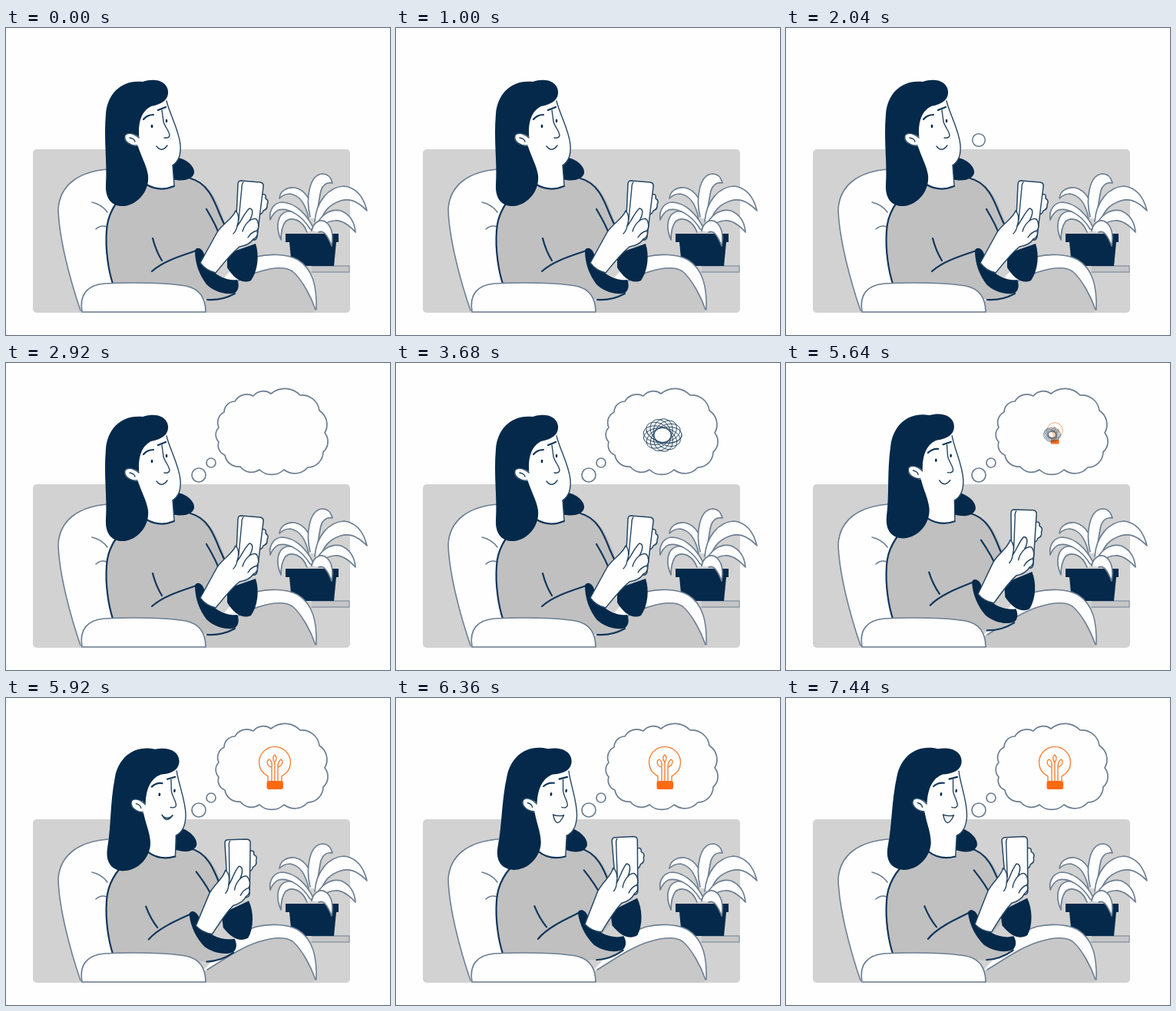
Animation, 500 px wide and 400 px high, one loop 8 s. Source, as an HTML page:

```html
<!DOCTYPE html>
<html lang="en">
<head>
<meta charset="utf-8">
<title>Bright idea</title>
<style>
html, body { margin: 0; height: 100%; overflow: hidden; background: #fefefe; }
svg { display: block; width: 500px; height: 400px; }
path, circle, ellipse { stroke-linecap: round; stroke-linejoin: round; }
.soft { fill: #fefefe; stroke: #6d7f92; stroke-width: 1.7; }
.skin { fill: #fefefe; stroke: #274763; stroke-width: 1.5; }
.plain { fill: #fefefe; }
.navy { fill: #04294a; }
.knit { fill: #c0c0c1; }
.line { fill: none; stroke: #12365a; stroke-width: 2.2; }
.fine { fill: none; stroke: #274763; stroke-width: 1.4; }
.thin { fill: none; stroke: #6d7f92; stroke-width: 1.6; }
.glow { fill: none; stroke: #f58a45; stroke-width: 1.5; }
</style>
</head>
<body>
<svg viewBox="0 0 500 400">
  <rect x="35" y="158" width="413" height="213" rx="5" fill="#d2d2d2"/>
  <path d="M398 310H447V318H398" fill="#c6c6c8" stroke="#8f99a6" stroke-width="1.3"/>

  <path class="navy" d="M364 268H433V279H430L427 310H372L369 279H364Z"/>
  <g id="plant" class="soft"></g>

  <!-- far armrest and legs -->
  <path class="plain" d="M256 356L300 308 326 298C342 294 366 294 380 302C400 314 405 338 404 368L390 370H262Z"/>
  <path class="thin" d="M310 305Q318 300 326 298C342 294 366 294 380 302C400 314 405 338 404 367"/>
  <path d="M256 357C285 340 306 325 328 318C347 312 364 311 373 317C386 328 398 352 403 368L400 371H256Z" fill="#c8c8c8"/>
  <path class="thin" d="M262 354C285 340 306 325 328 318C347 312 364 311 373 317C386 328 398 352 403 367"/>

  <!-- chair back -->
  <path class="plain" d="M97 368C84 330 69 275 68 236C70 205 94 187 133 184L160 240 150 345 110 370Z"/>
  <path class="thin" d="M97 368C84 330 69 275 68 236C70 205 94 187 133 184M112 227Q125 230 132 240M117 262Q124 256 131 259"/>

  <!-- sweater -->
  <path class="knit" d="M178 205C150 211 134 235 131 262C129 290 134 318 139 335L200 345 240 346 260 318 285 288 288 263C280 236 270 202 240 196L218 197Z"/>
  <path class="line" d="M160 212C142 224 132 245 131 264C129 290 134 318 139 333M240 196C262 201 271 224 278 242Q283 254 288 263"/>

  <g id="head">
    <path class="navy" d="M216 168C232 168 246 179 245 189C242 199 228 200 216 197Z"/>
    <path class="plain" d="M170 140L183 203Q200 214 219 206L217 176 226 160V140Z"/>
    <path class="line" d="M183 204Q200 214 219 206"/>
    <path class="fine" d="M217 178L219 205"/>
    <path class="plain" d="M172 105L209 94C214 112 225 132 227 152C228 168 222 176 214 180L180 176Z"/>
    <path class="fine" d="M209 95C213 112 225 132 227 152C228 167 224 175 217 179"/>
    <path class="navy" d="M178 70C150 67 132 86 130 112C127 146 132 176 130 204C129 225 140 233 154 232C172 230 187 212 185 192C183 178 175 166 171 151L174 147C171 126 175 109 189 102C205 99 212 92 211 82C209 68 193 65 178 70Z"/>
    <path class="plain" d="M179 151C174 137 160 135 155 140C152 148 161 154 173 154Z"/>
    <path class="fine" d="M173 143C165 136 157 136 155 140C153 148 162 154 171 153M161 143Q167 144 168 148"/>
    <path class="line" d="M179 119Q184 113 192 113M198 107L208 103"/>
    <path class="fine" d="M203 107L205 122C207 129 213 135 213 140Q212 144 206 143"/>
    <ellipse class="navy eye" cx="190" cy="128" rx="1.400"/>
    <ellipse class="navy eye" cx="209" cy="121" rx="1.300"/>
    <path id="mouth" class="skin"/>
  </g>

  <g id="arm">
    <path class="line" d="M261 236C267 246 275 260 279 273"/>
    <path class="navy" d="M288 294L325 281C330 296 328 316 319 329C308 334 297 327 288 312Z"/>
    <path class="skin" d="M331 217Q340 215 338 222Q343 225 340 230Q341 236 335 238Q333 244 327 243Z"/>
    <path class="skin" d="M306 199L331 201Q336 202 335 207L327 272Q326 277 321 276L302 272Q298 271 299 266L302 204Q302 199 306 199Z"/>
    <path class="fine" d="M309 201Q307 203 307 208L303 250"/>
    <path class="knit" d="M190 317C204 304 227 297 250 289L272 320 298 346C287 352 274 355 262 354C235 352 212 345 196 334Z"/>
    <path class="line" d="M190 317C204 304 227 297 248 290M298 346C287 352 274 355 262 354"/>
    <path class="line" d="M191 274Q195 290 203 303"/>
    <path class="navy" d="M246 290C248 284 256 287 258 295L273 320C283 327 293 329 301 328C304 334 303 342 298 345C287 349 270 343 261 334C252 322 246 307 246 290Z"/>
    <path class="skin" d="M253 306L275 266C283 254 295 249 299 238C304 243 303 252 301 258C306 252 311 240 317 235C323 236 321 244 317 251Q326 245 328 253Q330 259 327 264Q329 272 322 275Q317 283 304 285C292 295 282 308 273 319Q260 316 253 306Z"/>
    <path class="fine" d="M301 258Q300 264 296 268M317 251Q310 257 308 265M327 264Q319 266 315 273"/>
  </g>

  <path class="soft" d="M99 370C95 347 106 335 128 333C165 331 210 332 234 336C253 340 260 352 260 370Z"/>

  <g id="dotA"><circle class="soft" cx="251" cy="146" r="9"/></g>
  <g id="dotB"><circle class="soft" cx="267" cy="130" r="6"/></g>
  <g id="cloud"><path id="puffs" class="soft"/></g>
  <g id="bulb">
    <path class="glow" d="M341 108V102C334 98 329.500 92 329.500 84A20.500 20.500 0 0 1 370.500 84C370.500 92 366 98 359 102V108"/>
    <path class="glow" d="M346 108V90C339 89 339 81 343 80Q347 83 346 90M350 108V84C346 79 348 75 350 74Q354 78 350 84M354 108V90C361 88 361 81 358 80Q354 83 354 90"/>
    <rect x="339.500" y="108" width="21.500" height="11" rx="2.500" fill="#ff6a10"/>
  </g>
  <g id="tangle"><path id="scrawl" class="fine" style="stroke-width:1" pathLength="1" stroke-dasharray="1 2"/></g>
</svg>
<script>
const LOOP = 8000;
const $ = id => document.getElementById(id);
const clamp = v => Math.min(1, Math.max(0, v));
const span = (t, a, b) => clamp((t - a) / (b - a));
const smooth = p => p * p * (3 - 2 * p);
const pop = p => 1 - (1 - p) ** 3;

function zoom(id, x, y, s) {
  $(id).setAttribute('transform', `translate(${x} ${y}) scale(${s}) translate(${-x} ${-y})`);
  $(id).style.display = s > .01 ? '' : 'none';
}

// Each leaf: outer edge from the base to the tip, then back along the inner edge
$('plant').innerHTML = [
  'M392 266C386 250 372 245 364 252Q358 260 358 276C350 258 354 242 366 239C384 237 394 250 398 264',
  'M396 262C384 242 366 234 355 237Q348 240 344 250C342 236 350 227 360 227C378 228 392 244 400 260',
  'M394 248C390 228 382 218 370 216Q362 216 356 222C357 212 366 207 376 208C392 211 400 230 402 248',
  'M396 246C390 222 395 191 412 190Q422 190 425 202Q414 200 410 212C407 226 406 236 404 250',
  'M402 252C404 226 420 207 440 206C458 208 466 222 470 238C456 224 446 222 436 225C420 230 413 240 409 254',
  'M402 262C408 244 422 235 436 238C448 243 454 254 455 266C444 254 436 250 428 251C416 252 411 258 409 266',
  'M398 264C401 251 411 248 418 254C426 262 426 273 424 284C419 271 414 263 407 266'
].map(d => `<path d="${d}"/>`).join('');

// Puffs bulge in proportion to the distance between notches
const notches = [[277, 84], [284, 64], [298, 50], [322, 43], [345, 40], [383, 42], [408, 62], [415, 91],
  [413, 116], [393, 136], [362, 139], [330, 139], [305, 135], [285, 120], [277, 103]];
$('puffs').setAttribute('d', notches.map(([x, y], i) => {
  const [nx, ny] = notches[(i + 1) % notches.length];
  const r = .72 * Math.hypot(nx - x, ny - y);
  return `${i ? '' : `M${x} ${y}`}A${r} ${r} 0 0 1 ${nx} ${ny}`;
}).join('') + 'Z');

let scrawl = '';
for (let i = 0; i <= 320; i++) {
  const a = i / 320 * 46, turn = a * .23;
  const u = 25 * Math.cos(a), v = 11 * Math.sin(a);
  const x = 347 + u * Math.cos(turn) - v * Math.sin(turn);
  const y = 94 + .85 * (u * Math.sin(turn) + v * Math.cos(turn));
  scrawl += (i ? 'L' : 'M') + x.toFixed(1) + ' ' + y.toFixed(1);
}
$('scrawl').setAttribute('d', scrawl);

const blinks = [[40, 280], [1000, 1280], [3960, 4160], [7000, 7240]];

function draw(now) {
  const t = now % LOOP;
  const lean = smooth(span(t, 5160, 6200));
  $('head').setAttribute('transform', `translate(${2 * lean} ${-3 * lean}) rotate(${7.4 * lean} 192 205)`);
  $('arm').setAttribute('transform', `translate(${-6 * lean} ${-3 * lean}) rotate(${-7.5 * lean} 190 310)`);

  const grin = smooth(span(t, 5800, 6200));
  $('mouth').setAttribute('d', `M196 154Q203 ${163 + 11 * grin} 210 153Q203 ${163 - 7 * grin} 196 154`);

  const shut = Math.max(...blinks.map(([a, b]) => Math.sin(Math.PI * span(t, a, b))));
  document.querySelectorAll('.eye').forEach(e => e.setAttribute('ry', 2.3 - 1.8 * shut));

  zoom('dotA', 251, 146, pop(span(t, 1880, 2160)));
  zoom('dotB', 267, 130, pop(span(t, 2040, 2320)));
  zoom('cloud', 346, 90, pop(span(t, 2200, 2680)));

  const drawn = span(t, 2960, 3800);
  $('scrawl').setAttribute('stroke-dashoffset', 1 - smooth(drawn));
  zoom('tangle', 346, 93, drawn ? 1 - smooth(span(t, 5320, 5920)) : 0);
  zoom('bulb', 350, 92, smooth(span(t, 5340, 5940)));
}

const start = performance.now();
(function tick() {
  draw(performance.now() - start);
  requestAnimationFrame(tick);
})();
</script>
</body>
</html>
```
